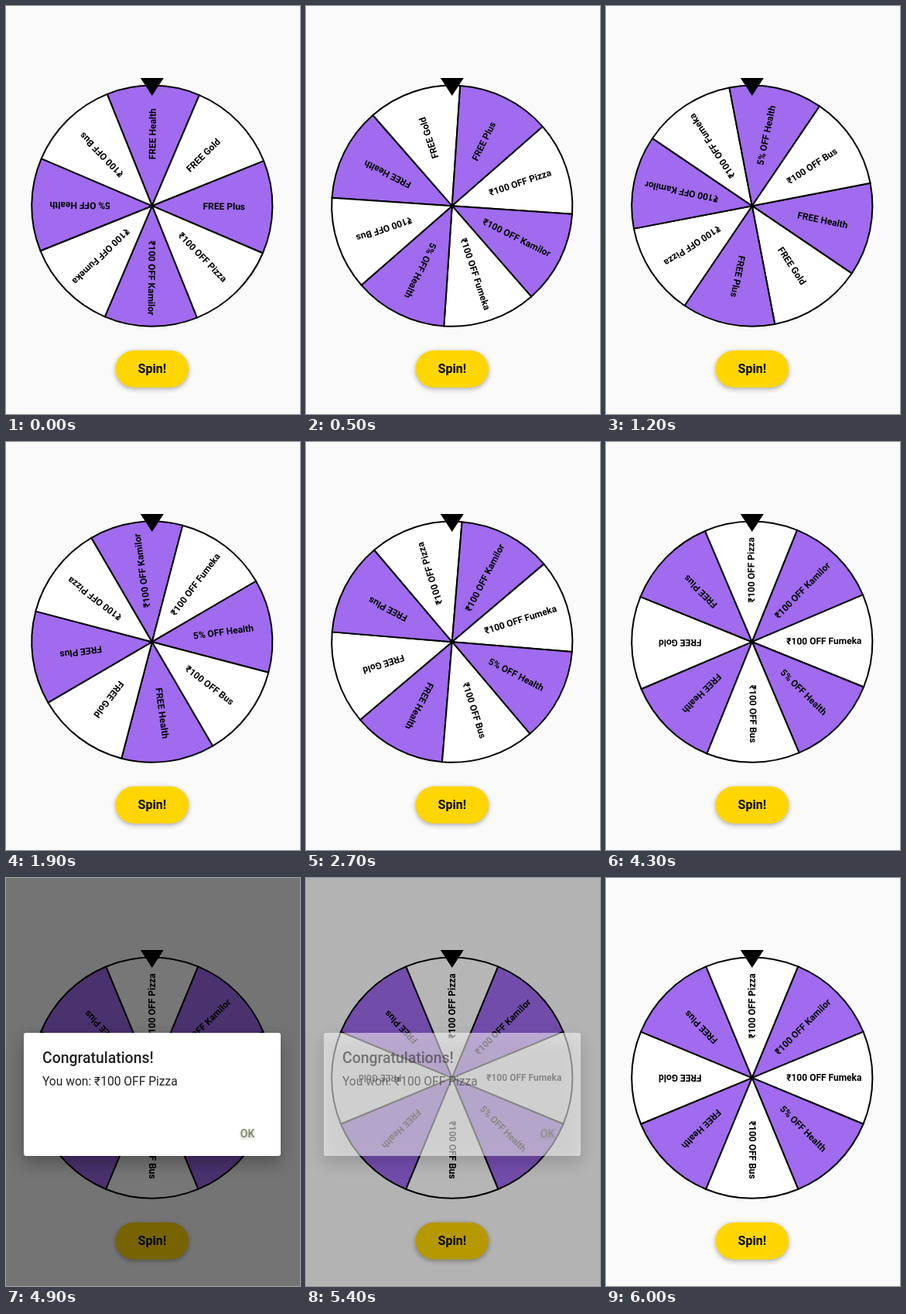
Recreate the animation shown at these times as an HTML page with a canvas. Size 380 px wide and 527 px high, loop 6100 ms.

```html
<!DOCTYPE html>
<html lang="en">
<head>
<meta charset="utf-8">
<title>Prize wheel</title>
<style>
  html, body { margin: 0; width: 100%; height: 100%; overflow: hidden; background: #fafafa; }
  canvas { display: block; width: 380px; height: 527px; }
</style>
</head>
<body>
<canvas id="stage"></canvas>
<script>
const W = 380, H = 527, LOOP = 6100, STEP = 100;
const CENTER = { x: 188.8, y: 258.2 }, RADIUS = 155.6, LABEL_RADIUS = 93;
const PRIZES = ['FREE Health', 'FREE Gold', 'FREE Plus', '₹100 OFF Pizza',
  '₹100 OFF Kamilor', '₹100 OFF Fumeka', '5% OFF Health', '₹100 OFF Bus'];
const SLICE = 2 * Math.PI / PRIZES.length;
const SPIN = { from: 0.6, to: 585, duration: 5140 };
const DIALOG = { open: 4500, close: 5330, fade: 150 };

const canvas = document.getElementById('stage');
const ctx = canvas.getContext('2d');
const scale = window.devicePixelRatio || 1;
canvas.width = W * scale;
canvas.height = H * scale;

const clamp = v => Math.min(1, Math.max(0, v));

// Cubic bezier (0.119, 1, 0.397, 1), solved by bisection.
function easeSpin(x) {
  let low = 0, high = 1;
  for (let i = 0; i < 40; i++) {
    const s = (low + high) / 2, v = 1 - s;
    if (3 * v * v * s * 0.119 + 3 * v * s * s * 0.397 + s ** 3 < x) low = s;
    else high = s;
  }
  return 1 - (1 - low) ** 3;
}

function text(str, x, y, font, color, align = 'left') {
  ctx.font = `${font} Roboto, sans-serif`;
  ctx.fillStyle = color;
  ctx.textAlign = align;
  ctx.fillText(str, x, y);
}

function shadow(color, blur, y) {
  ctx.shadowColor = color;
  ctx.shadowBlur = blur * scale;
  ctx.shadowOffsetY = y * scale;
}

function roundBox(x, y, w, h, r, color) {
  ctx.beginPath();
  ctx.roundRect(x, y, w, h, r);
  ctx.fillStyle = color;
  ctx.fill();
}

function drawWheel(degrees) {
  ctx.save();
  ctx.translate(CENTER.x, CENTER.y);
  ctx.rotate(degrees * Math.PI / 180 - Math.PI / 2);
  ctx.lineWidth = 2;
  ctx.lineJoin = 'round';
  ctx.strokeStyle = '#000';
  PRIZES.forEach((prize, i) => {
    ctx.save();
    ctx.rotate(i * SLICE);
    ctx.beginPath();
    ctx.moveTo(0, 0);
    ctx.arc(0, 0, RADIUS, -SLICE / 2, SLICE / 2);
    ctx.closePath();
    ctx.fillStyle = i % 2 ? '#fff' : '#a06bee';
    ctx.fill();
    ctx.stroke();
    text(prize, LABEL_RADIUS, 3.8, 'bold 12px', '#000', 'center');
    ctx.restore();
  });
  ctx.restore();
}

function drawPointer() {
  ctx.beginPath();
  ctx.moveTo(CENTER.x - 15, 93);
  ctx.lineTo(CENTER.x + 15, 93);
  ctx.lineTo(CENTER.x, 116);
  ctx.fillStyle = '#000';
  ctx.fill();
}

function drawButton() {
  ctx.save();
  shadow('rgba(0,0,0,0.32)', 6, 2);
  roundBox(CENTER.x - 47.3, 444.8, 94.6, 48, 24, '#ffd600');
  ctx.restore();
  text('Spin!', CENTER.x, 473.7, 'bold 16px', '#000', 'center');
}

function drawDialog(alpha) {
  if (alpha <= 0) return;
  ctx.save();
  ctx.globalAlpha = alpha;
  ctx.fillStyle = 'rgba(0,0,0,0.535)';
  ctx.fillRect(0, 0, W, H);
  ctx.save();
  shadow('rgba(0,0,0,0.3)', 22, 9);
  roundBox(23, 200, 332, 159, 3, '#fff');
  ctx.restore();
  text('Congratulations!', 47, 238.7, '500 19.4px', '#212121');
  text('You won: ₹100 OFF Pizza', 47, 268.2, '400 15.6px', '#212121');
  shadow('rgba(120,130,30,0.5)', 3, 2);
  text('OK', 312, 334.5, '500 14px', '#7a867c', 'center');
  ctx.restore();
}

function draw(t) {
  ctx.setTransform(scale, 0, 0, scale, 0, 0);
  ctx.fillStyle = '#fafafa';
  ctx.fillRect(0, 0, W, H);
  drawWheel(SPIN.from + (SPIN.to - SPIN.from) * easeSpin(clamp(t / SPIN.duration)));
  drawPointer();
  drawButton();
  drawDialog(Math.min(clamp((t - DIALOG.open) / DIALOG.fade),
    1 - clamp((t - DIALOG.close) / DIALOG.fade)));
}

// The motion advances in even steps of ten per second.
const start = performance.now();
function tick() {
  const t = (performance.now() - start) % LOOP;
  draw(Math.floor(t / STEP) * STEP);
  requestAnimationFrame(tick);
}
tick();
</script>
</body>
</html>
```
